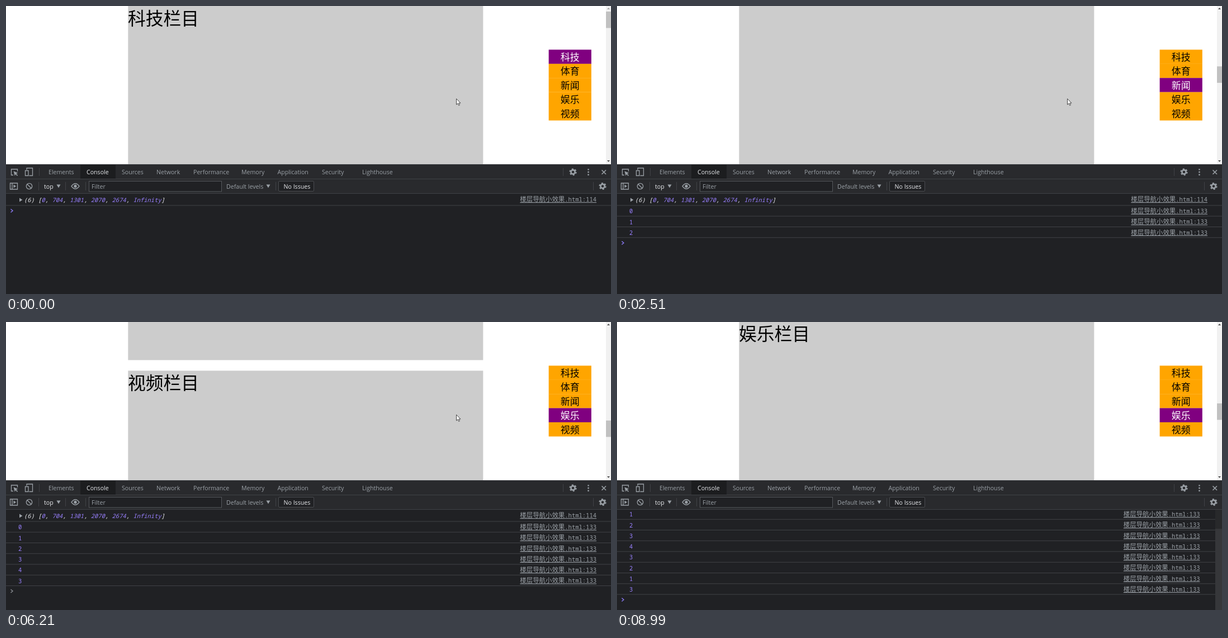
An HTML page that plays this animation: 1082x517 px, repeating every 9.39 s.

```html
<!DOCTYPE html>
<html lang="zh">
<head>
<meta charset="utf-8">
<title>Floor navigation</title>
<style>
  html, body { margin: 0; width: 100%; height: 100%; overflow: hidden; background: #fff; }
  svg { display: block; }
  text { white-space: pre; }
  .cjk { font-family: "Noto Sans CJK SC", "Noto Sans CJK", sans-serif; }
  .ui { font: 10.6px "Open Sans", "Noto Sans", sans-serif; fill: #9aa0a6; }
  .ui .lit { fill: #e8eaed; }
  .mono { font: 10.5px "Noto Sans Mono", "DejaVu Sans Mono", monospace; fill: #9980ff; }
  .link { fill: #9aa0a6; text-anchor: end; text-decoration: underline; }
  .link .cjk { font-size: 11.43px; }
  .icon { fill: none; stroke: #9aa0a6; stroke-width: 1.3; }
  .rule { stroke: #404246; }
</style>
</head>
<body>
<svg width="1082" height="517" viewBox="0 0 1082 517">
  <defs>
    <g id="gear" class="icon">
      <circle r="3.6" stroke-width="2.6"/>
      <circle r="5.6" stroke-width="2" stroke-dasharray="2.93"/>
    </g>
  </defs>

  <g id="page" class="cjk" font-size="31.75"></g>
  <g id="nav" class="cjk" font-size="16.9" text-anchor="middle"></g>
  <rect x="1073" width="9" height="284" fill="#f1f1f1"/>
  <path id="up" d="M1075 6h5l-2.500-3z"/>
  <path d="M1075 277h5l-2.500 3z" fill="#505050"/>
  <rect id="thumb" x="1073" width="9" height="29.5" fill="#c1c1c1"/>

  <rect y="284" width="1082" height="233" fill="#202124"/>
  <g id="log" class="mono">
    <path d="M24 344.500v7l5.500-3.500z" fill="#9aa0a6"/>
    <text id="list" x="32" y="351.800" font-style="italic" fill="#e8eaed"></text>
    <path class="rule" d="M0 358h1082"/>
    <path id="prompt" d="M8.500 -3l3.500 3l-3.500 3" fill="none" stroke-width="1.5"/>
  </g>
  <g id="bar">
    <rect x="1070" y="337" width="12" height="180" fill="#28292b"/>
    <rect id="barThumb" x="1070" width="12" fill="#36373a"/>
  </g>

  <rect y="284" width="1082" height="53" fill="#292a2d"/>
  <rect x="133" y="285" width="63" height="25" fill="#1c1d1f"/>
  <path class="rule" d="M0 284.500h1082M0 310.500h1082M0 336.500h1082M59.500 291v14M996.500 291v14M58.500 316v15M106.500 316v15M142.500 316v15M482.500 316v15M1050.500 316v15"/>
  <g class="icon">
    <path d="M13 303.500h-3.500v-10.500h11v4"/>
    <path d="M13.500 296.500l8 3.200l-3.300 1.300l3 3l-1.200 1l-3-3l-1.300 3z" fill="#9aa0a6" stroke="none"/>
    <path d="M37 294v-3h10.500v13.500h-6M34.500 295.500h5.500v9h-5.500z"/>
    <path d="M1065.500 294.500l7.500 7.500m0-7.500l-7.500 7.500" stroke-width="1.6"/>
    <path d="M7.500 318h13v11h-13zM11 318v11"/>
    <path d="M13.500 320.500v6l4.500-3z" fill="#9aa0a6" stroke="none"/>
    <circle cx="41.500" cy="323.500" r="5.200"/>
    <path d="M37.800 319.800l7.400 7.400"/>
    <path d="M117 323.500q7-9.500 14 0q-7 9.500-14 0z"/>
    <circle cx="124" cy="323.500" r="2" fill="#9aa0a6"/>
    <path d="M1041.500 293.500h.01M1041.500 298.200h.01M1041.500 302.900h.01" stroke-width="2.700" stroke-linecap="round"/>
    <path d="M90.500 320.500h7l-3.500 6zM465.500 320.500h7l-3.500 6z" fill="#9aa0a6" stroke="none"/>
  </g>
  <use href="#gear" x="1014" y="298"/>
  <use href="#gear" x="1067" y="323.500"/>
  <rect x="148.500" y="314.500" width="237" height="18.500" fill="#202124" stroke="#55585c"/>
  <rect x="487.500" y="314.500" width="63" height="18" rx="1.500" fill="#202124" stroke="#4a4c50"/>
  <g id="ui" class="ui">
    <text class="lit" x="68" y="327.500">top</text>
    <text x="153" y="327.800">Filter</text>
    <text x="394" y="327.500">Default levels</text>
    <text class="lit" x="496.500" y="327.500">No Issues</text>
  </g>

  <path id="cursor" d="M0 0v10.500l2.500-2.200l1.700 3.700l1.700-.8l-1.700-3.500h3.200z" fill="#fff" stroke="#333" stroke-width=".9"/>
</svg>

<script>
const LOOP = 9390, SCALE = 0.635, MAX_SCROLL = 2262, ROW = 19.25;
const names = ['科技', '体育', '新闻', '娱乐', '视频'];
const offsets = [0, 704, 1301, 2070, 2674];
const tops = offsets.map(o => o * SCALE);
const $ = id => document.getElementById(id);

function add(parent, tag, attrs, html = '') {
  const el = document.createElementNS('http://www.w3.org/2000/svg', tag);
  set(el, attrs);
  el.innerHTML = html;
  return parent.appendChild(el);
}
function set(el, attrs) {
  for (const key in attrs) el.setAttribute(key, attrs[key]);
}

// Scroll bursts: start, ms per step, steps, final scroll, easing power
const bursts = [
  [1050, 73.75, 9, 390, 2.1],
  [1780, 67, 8, 788, 0.65],
  [2390, 60, 3, 950, 0.6],
  [2710, 85, 9, 1588.5, 1],
  [3590, 75, 11, MAX_SCROLL, 1],
  [5400, 80, 12, 1480, 2.1],
  [6350, 73.3, 13, 677, 1],
  [8040, 0, 1, tops[3], 1]
];
const steps = [{ time: 0, scroll: 0, floor: 0, count: 0 }];
const logs = [];
for (const [start, gap, n, to, power] of bursts) {
  const from = steps[steps.length - 1].scroll;
  for (let k = 0; k < n; k++) {
    const scroll = from + (to - from) * ((k + 1) / n) ** power;
    const floor = tops.filter(y => y <= scroll + 0.01).length - 1;
    if (floor !== logs[logs.length - 1]) logs.push(floor);
    steps.push({ time: start + gap * k, scroll, floor, count: logs.length });
  }
}

// Pointer: time, x, y
const pointer = [
  [0, 805.5, 166.5], [6350, 805.5, 166.5], [6800, 935.5, 151.5], [7360, 935.5, 151.5],
  [8000, 1010, 169], [8510, 1010, 169], [8990, 9, 467]
];
function pointerAt(t) {
  const i = pointer.findIndex(p => p[0] > t);
  if (i < 0) return null;
  const [t0, x0, y0] = pointer[i - 1], [t1, x1, y1] = pointer[i];
  const u = (t - t0) / (t1 - t0);
  return [x0 + (x1 - x0) * u, y0 + (y1 - y0) * u];
}

tops.forEach((y, i) => {
  const end = i < 4 ? tops[i + 1] - 19 : 2527;
  add($('page'), 'rect', { x: 218.3, y, width: 635, height: end - y, fill: '#ccc' });
  add($('page'), 'text', { x: 218, y: y + 33.5 }, names[i] + '栏目');
});
const items = names.map((name, i) => {
  const y = 78.4 + 25.4 * i;
  return [
    add($('nav'), 'rect', { x: 970.6, y, width: 76.2, height: 25.5 }),
    add($('nav'), 'text', { x: 1008.7, y: y + 19.6 }, name)
  ];
});

const link = (y, line) => add($('log'), 'text', { class: 'link', x: 1056, y },
  `<tspan class="cjk">楼层导航小效果</tspan>.html:${line}`);
const numbers = [...offsets, 'Infinity'].map(n => `<tspan fill="#9980ff">${n}</tspan>`);
$('list').innerHTML = `(6) [${numbers.join(', ')}]`;
$('list').style.fill = '#e8eaed';
const links = [link(351.2, 114)];
const rows = logs.map((floor, i) => {
  const y = 358 + ROW * i;
  links.push(link(y + 14.2, 133));
  return [
    links[i + 1],
    add($('log'), 'text', { x: 22, y: y + 14.4 }, floor),
    add($('log'), 'path', { class: 'rule', d: `M0 ${y + ROW}h1082` })
  ];
});

[['Elements', 76], ['Console', 144, 'lit'], ['Sources', 207], ['Network', 269],
 ['Performance', 335], ['Memory', 421], ['Application', 485.5], ['Security', 565],
 ['Lighthouse', 637]].forEach(([label, x, cls = '']) =>
  add($('ui'), 'text', { x, y: 302.3, class: cls }, label));

function draw() {
  const t = performance.now() % LOOP;
  const { scroll, floor, count } = steps.filter(s => s.time <= t).pop();

  set($('page'), { transform: `translate(0 ${-scroll})` });
  set($('thumb'), { y: 10 + scroll / MAX_SCROLL * 234.3 });
  set($('up'), { fill: scroll ? '#505050' : '#a3a3a3' });
  items.forEach(([box, label], i) => {
    set(box, { fill: i === floor ? '#800080' : '#ffa500' });
    set(label, { fill: i === floor ? '#fff' : '#000' });
  });

  const height = 49 + ROW * count;
  const over = Math.max(0, height - 180);
  set($('log'), { transform: `translate(0 ${-over})` });
  rows.forEach((row, i) => row.forEach(el => set(el, { display: i < count ? 'inline' : 'none' })));
  links.forEach(el => set(el, { x: over ? 1042.5 : 1056 }));
  set($('prompt'), {
    transform: `translate(0 ${367.5 + ROW * count})`,
    stroke: t > 3590 && t < 6350 ? '#85888e' : '#8877ee'
  });
  const barHeight = 180 * 180 / height;
  set($('bar'), { display: over ? 'inline' : 'none' });
  set($('barThumb'), { y: 517 - barHeight, height: barHeight });

  const at = pointerAt(t);
  set($('cursor'), { display: at ? 'inline' : 'none' });
  if (at) set($('cursor'), { transform: `translate(${at})` });
  requestAnimationFrame(draw);
}
draw();
</script>
</body>
</html>
```
